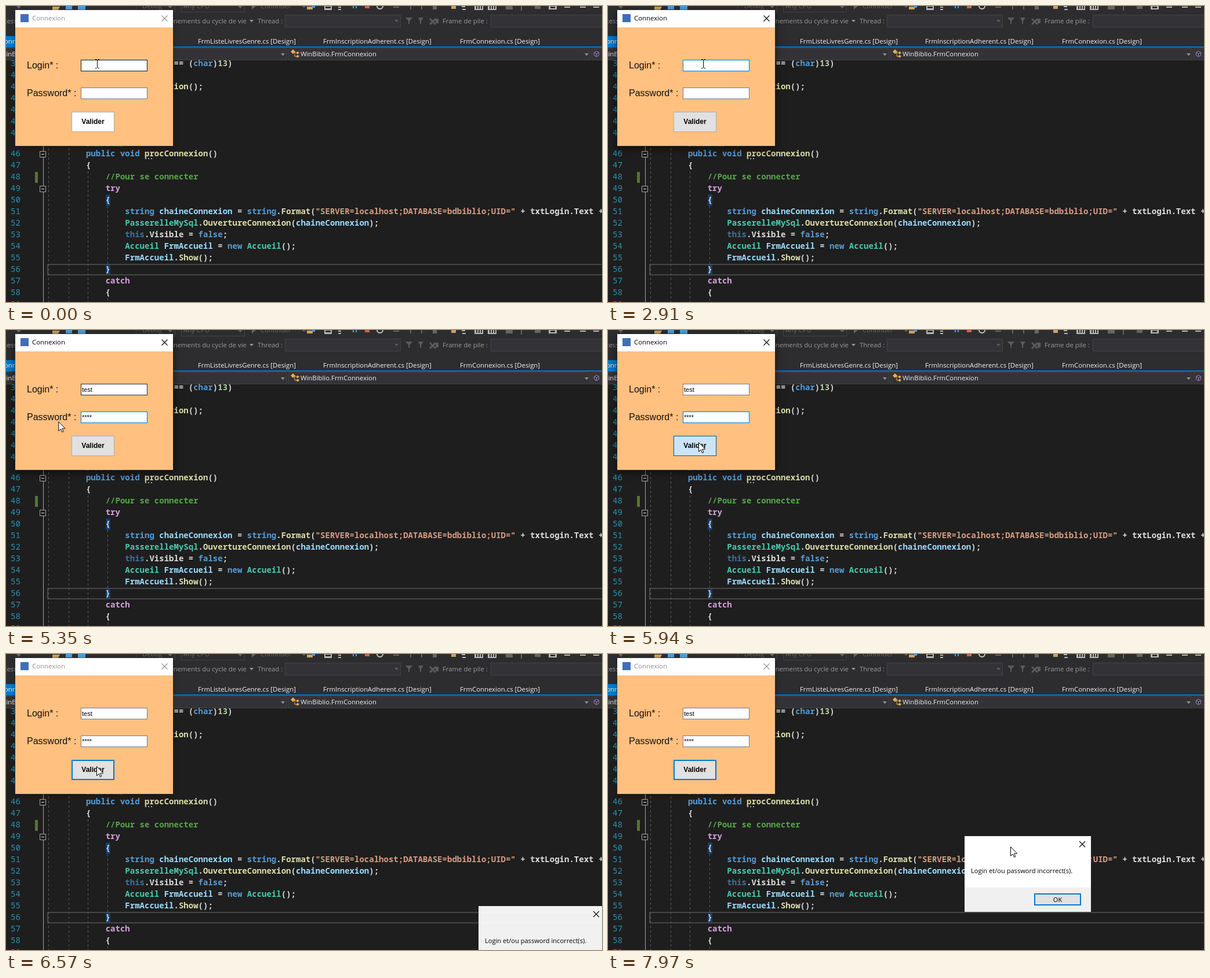
Recreate the animation shown at these times as an HTML page. Size 1028 px wide and 512 px high, loop 7.99 s.

```html
<!DOCTYPE html>
<html lang="fr">
<head>
<meta charset="utf-8">
<title>Connexion</title>
<style>
html, body { margin: 0; width: 100%; height: 100%; overflow: hidden; background: #1e1e1e; }
* { box-sizing: border-box; animation-duration: 7.99s; animation-iteration-count: infinite; animation-timing-function: linear; }
#stage { position: absolute; inset: 0; width: 1028px; height: 512px; overflow: hidden; }
#stage > *, #form > *, #dialog > *, #pointer > * { position: absolute; }
svg { left: 0; top: 0; overflow: visible; }
.ui, #dialog, #title { font-family: "Open Sans", "Noto Sans", sans-serif; }
.ui { font-size: 11.35px; }

/* editor */
pre { margin: 0; font: 600 14.04px/20.08px "Noto Sans Mono", "DejaVu Sans Mono", monospace; color: #dcdcdc; white-space: pre; }
.nums { left: 8px; color: #2b91af; font-weight: 500; }
.code { left: 70.6px; }
.high { top: 88.5px; }
.low { top: 244.5px; }
.k { color: #569cd6; } .d { color: #3f719b; } .c { color: #d8a0df; } .t { color: #4ec9b0; }
.v { color: #9cdcfe; } .m { color: #dcdcaa; } .s { color: #d69d85; } .n { color: #b5cea8; } .r { color: #57a64a; }

/* login form */
#form { left: 16px; top: 7px; width: 272px; height: 235px; background: linear-gradient(#fff 30px, #ffc080 30px); animation-name: shade; }
#icon { left: 9px; top: 7px; width: 14px; height: 14px; background: #3f6fb8; }
#title { left: 29px; top: 5px; font-size: 11.4px; line-height: 18px; animation-name: title; }
#x { left: 252px; top: 9px; animation-name: title; }
.label { left: 20px; font: 16px/20px "Liberation Sans", Arial, sans-serif; color: #111; }
.field { left: 113px; width: 115px; height: 20px; border: 1px solid #7a7a7a; background: #fff; padding-left: 1px; font: 11px/18px "Liberation Sans", Arial, sans-serif; color: #000; }
.field span { display: block; height: 18px; overflow: hidden; white-space: nowrap; animation-timing-function: step-end; }
#login { top: 86px; animation-name: login; }
#login span { animation-name: typeLogin; }
#pass { top: 134px; animation-name: pass; }
#pass span { animation-name: typePass; }
#caret { left: 116px; top: 89px; width: 1px; height: 13px; background: #000; animation-name: caret; animation-timing-function: step-end; }
#ok { left: 97px; top: 176px; width: 74px; height: 35px; text-align: center; font: bold 12px/35px "Liberation Sans", Arial, sans-serif; color: #000; animation-name: button; animation-timing-function: step-end; }

/* message box */
#dialog { left: 0; top: 0; width: 218px; height: 131px; background: linear-gradient(#fff 89px, #f0f0f0 89px); color: #000; font-size: 11.1px; animation-name: dialog; }
#msg { left: 11px; top: 52px; line-height: 16px; white-space: nowrap; }
#dialog .btn { left: 120px; top: 99px; width: 81px; height: 21px; border: 2px solid #0078d7; background: #e1e1e1; text-align: center; line-height: 17px; }

#pointer { left: 0; top: 0; width: 0; height: 0; animation-name: move; }
#beam { animation-name: beam; animation-timing-function: step-end; }
#arrow { animation-name: arrow; animation-timing-function: step-end; }

@keyframes shade {
  0%, 14.393%, 79.599%, 100% { box-shadow: 0 0 0 1px #3a3a3a66, 0 2px 8px rgba(0,0,0,.35); }
  16.646%, 79.5% { box-shadow: 0 0 0 1px #3a3a3a66, 0 4px 14px rgba(0,0,0,.6); }
}
@keyframes title {
  0%, 14.393%, 79.599%, 100% { color: #8f8f8f; }
  15.2%, 79.5% { color: #000; }
}
@keyframes login {
  0%, 14.393% { border-color: #171717; background: #fdfdfd; }
  16.646%, 48.685% { border-color: #0078d7; background: #fff; }
  48.686%, 66.96% { border-color: #2a2a2a; }
  69%, 100% { border-color: #7a7a7a; background: #fff; }
}
@keyframes pass {
  0%, 14.393% { border-color: #7a7a7a; background: #fdfdfd; }
  16.646%, 48.685% { border-color: #7a7a7a; background: #fff; }
  48.686%, 74.342% { border-color: #0078d7; }
  76.5%, 100% { border-color: #7a7a7a; background: #fff; }
}
@keyframes typeLogin {
  0% { width: 0; } 42.303% { width: 3px; } 43.054% { width: 9px; }
  45.307% { width: 14.7px; } 46.433%, 100% { width: 30px; }
}
@keyframes typePass {
  0% { width: 0; } 51.314% { width: 4.3px; } 53.317% { width: 8.6px; }
  56.32% { width: 12.9px; } 57.447%, 100% { width: 30px; }
}
@keyframes caret {
  0%, 23.154%, 36.421%, 63.8%, 74.343%, 100% { opacity: 0; transform: none; }
  16.646%, 29.787% { opacity: 1; transform: none; }
  42.303% { opacity: 1; transform: translate(3px, 0); }
  43.054% { opacity: 1; transform: translate(8px, 0); }
  45.307% { opacity: 1; transform: translate(14px, 0); }
  46.433% { opacity: 1; transform: translate(17px, 0); }
  48.686% { opacity: 1; transform: translate(0, 48px); }
  51.314% { opacity: 1; transform: translate(4px, 48px); }
  53.317% { opacity: 1; transform: translate(8px, 48px); }
  56.32% { opacity: 1; transform: translate(12px, 48px); }
  57.447%, 70.463% { opacity: 1; transform: translate(16px, 48px); }
}
@keyframes button {
  0% { background: #fdfdfd; box-shadow: inset 0 0 0 1px #adadad; }
  15.2% { background: #e1e1e1; box-shadow: inset 0 0 0 1px #adadad; }
  69.2% { background: #e5f1fb; box-shadow: inset 0 0 0 1px #0078d7; }
  74.343% { background: #cce4f7; box-shadow: inset 0 0 0 1px #005499; }
  76.2% { background: #e5f1fb; box-shadow: inset 0 0 0 2px #0078d7; }
  77.347%, 100% { background: #e1e1e1; box-shadow: inset 0 0 0 2px #0078d7; }
}
@keyframes dialog {
  0%, 79.598% { opacity: 0; transform: translate(815px, 436px) scale(.95); }
  79.599% { opacity: .02; transform: translate(815px, 436px) scale(.95); }
  79.975% { opacity: .06; transform: translate(815px, 436px) scale(.963); }
  82.228% { opacity: .94; transform: translate(815px, 436px); }
  82.603% { opacity: 1; transform: translate(815px, 436px); animation-timing-function: step-end; }
  95.62% { opacity: 1; transform: translate(810px, 433px); animation-timing-function: step-end; }
  95.995% { opacity: 1; transform: translate(786px, 417px); animation-timing-function: step-end; }
  96.371% { opacity: 1; transform: translate(690px, 350px); animation-timing-function: step-end; }
  96.746% { opacity: 1; transform: translate(599px, 317px); animation-timing-function: step-end; }
  97.372%, 100% { opacity: 1; transform: translate(615px, 315px); }
}
@keyframes move {
  0%, 20.15% { transform: translate(157px, 100px); }
  21.7%, 63.204% { transform: translate(164px, 100px); }
  63.955% { transform: translate(118px, 83px); }
  64.831% { transform: translate(60px, 88px); }
  65.457% { transform: translate(52px, 110px); }
  66.208% { transform: translate(66px, 140px); }
  66.959% { transform: translate(90px, 158px); }
  68.836% { transform: translate(122px, 180px); }
  72.466% { transform: translate(156px, 194px); }
  83.5% { transform: translate(156px, 194px); animation-timing-function: ease-in-out; }
  89.362%, 89.737% { transform: translate(897px, 410px); }
  92.616% { transform: translate(896px, 454px); animation-timing-function: step-end; }
  95.62% { transform: translate(880px, 446px); animation-timing-function: step-end; }
  95.995% { transform: translate(837px, 417px); animation-timing-function: step-end; }
  96.371% { transform: translate(720px, 352px); animation-timing-function: step-end; }
  96.746% { transform: translate(679px, 335px); animation-timing-function: step-end; }
  97.372% { transform: translate(696px, 333px); animation-timing-function: step-end; }
  99.75%, 100% { transform: translate(694px, 333px); }
}
@keyframes beam { 0%, 63.204% { opacity: 1; } 42.303%, 63.8%, 100% { opacity: 0; } }
@keyframes arrow { 0% { opacity: 0; } 63.8%, 100% { opacity: 1; } }
</style>
</head>
<body>
<div id="stage">
  <svg class="ui" width="1028" height="512">
    <rect width="1028" height="94" fill="#2d2d30"/>
    <!-- toolbar, cut off by the top edge -->
    <g fill="none" stroke="#434346">
      <path d="M224.5 0V10.5H291.5V0M302.5 0V10.5H411.5V0"/>
      <path d="M481.5 15.5H680.5V36.5H481.5ZM1030 15.5H836.5V36.5H1030" fill="#333337"/>
    </g>
    <g fill="#656565">
      <text x="235" y="4">Debug</text><text x="306" y="4">Any CPU</text><text x="439" y="4">Continuer</text>
      <path d="M279 0h8l-4 4zM400 0h8l-4 4zM424 0h7l-7 6zM511 0h6l-3 3zM18 0h8l-4 5z"/>
      <path d="M668 1h10v2h-10zM697 0h2v6h-2zM716 0h2v6h-2zM736 0h7v6h-7zM862 0h12v6h-12zM888 0h2v8h-2zM912 0h10v5h-10z"/>
    </g>
    <path d="M80 1h13l-3 6H80zM519 1h10v5h-10zM768 0h8v5h-8z" fill="#c9a262"/>
    <path d="M103 0h11v6h-11zM124 0h13v7h-13zM528 0h5v3h-5zM598 0h2v4h-2zM603 0h2v4h-2z" fill="#4f9fd8"/>
    <path d="M619 0h8v4h-8z" fill="#d9604a"/>
    <path d="M640 0a5 5 0 0 0 10 0" fill="none" stroke="#c8c8c8" stroke-width="2"/>
    <path d="M549 0h13v7h-13zM573 1h5v2h-5zM573 5h5v2h-5zM786 0h6v2h-6zM787 5h6v2h-6zM808 0h15v7h-15zM831 0h15v7h-15zM936 0h14v6h-14zM963 1h10v2h-10zM990 1h10v2h-10zM1013 1h10v2h-10z" fill="#b5b5b5"/>
    <path d="M551 1h9v3h-9zM811 0h2v5h-2zM815 0h2v5h-2zM819 0h2v5h-2zM834 0h2v5h-2zM838 0h2v5h-2zM842 0h2v5h-2zM939 1h8v3h-8z" fill="#2d2d30"/>

    <g fill="#999">
      <text x="-4" y="30">cess</text>
      <text x="415" y="30" text-anchor="end">Événements du cycle de vie</text>
      <text x="434" y="30">Thread :</text><text x="753" y="30">Frame de pile :</text>
      <path d="M420 24h7l-3.500 4z"/>
    </g>
    <g fill="#5b5b5e">
      <path d="M670 24h7l-3.500 4zM689 20h12l-5 6v6l-2-2v-4zM711 20h9l-4 6v6l-2-2v-4zM732 21l4 4 4-4 2 2-4 4 4 4-2 2-4-4-4 4-2-2 4-4-4-4zM741 22h5v8h-5z"/>
    </g>

    <!-- document tabs and navigation bar -->
    <path d="M0 52H200V72H0ZM0 70H1028V72H0Z" fill="#007acc"/>
    <g fill="#f1f1f1">
      <text x="-3" y="65">onn</text>
      <text x="331" y="65">FrmListeLivresGenre.cs [Design]</text>
      <text x="547" y="65">FrmInscriptionAdherent.cs [Design]</text>
      <text x="783" y="65">FrmConnexion.cs [Design]</text>
    </g>
    <path d="M-2 73.500H484.500V93.500H-2ZM487.500 73.500H1007.500V93.500H487.500ZM1010.500 73.500H1030V93.500H1010.500Z" fill="#333337" stroke="#434346"/>
    <g fill="#f1f1f1"><text x="-10" y="87">WinBiblio</text><text x="508" y="87">WinBiblio.FrmConnexion</text></g>
    <path d="M474 82h7l-3.500 4zM998 82h7l-3.500 4z" fill="#999"/>
    <path d="M491 79l4-4 4 4-4 4zM500 81l3-2.500 3 2.500-3 2.500zM500 87l3-2.500 3 2.500-3 2.500z" fill="#e8ab53"/>
    <path d="M496 80h4M498 80v7h3" fill="none" stroke="#e8ab53"/>
    <path d="M1018.500 78l4 2.300v5l-4 2.300-4-2.300v-5zM1014.500 80.300l4 2.400 4-2.400M1018.500 82.700v5" fill="none" stroke="#a77fc9"/>

    <!-- editor furniture -->
    <text x="138" y="243" fill="#8a8a8a" font-size="11">2 références</text>
    <path d="M50 287h5v19h-5z" fill="#577430"/>
    <path d="M172 326h8v20h-8zM172 446h8v20h-8z" fill="#113d6f"/>
    <path d="M1030 447H72V465H1030" fill="none" stroke="#464646" stroke-width="2"/>
    <g fill="none" stroke="#5a5a5a" stroke-dasharray="4 4">
      <path d="M73.500 246V512M108.500 246V512M141.500 286V512M175.500 346V446M175.500 506V512"/>
    </g>
    <path d="M64.500 242V512" stroke="#a5a5a5"/>
    <path d="M58.500 251.500h10v10h-10zM58.500 311.500h10v10h-10z" fill="#1e1e1e" stroke="#a5a5a5"/>
    <path d="M61 256.500h5M61 316.500h5" stroke="#dcdcdc"/>
    <path d="M240 263h2v2h-2zM245 263h2v2h-2zM250 263h2v2h-2z" fill="#aaa"/>
  </svg>

<pre class="nums high">39
40
41
42
43
44
45</pre>
<pre class="nums low">46
47
48
49
50
51
52
53
54
55
56
57
58
59</pre>
<pre class="code high">            <span class="c">if</span> (e.KeyChar == (<span class="k">char</span>)<span class="n">13</span>)

                <span class="m">procConnexion</span>();</pre>
<pre class="code low">        <span class="k">public void</span> <span class="m">procConnexion</span>()
        {
            <span class="r">//Pour se connecter</span>
            <span class="c">try</span>
            {
                <span class="k">string</span> <span class="v">chaineConnexion</span> = <span class="k">string</span>.<span class="m">Format</span>(<span class="s">"SERVER=localhost;DATABASE=bdbiblio;UID="</span> + txtLogin.Text +
                <span class="t">PasserelleMySql</span>.<span class="m">OuvertureConnexion</span>(<span class="v">chaineConnexion</span>);
                <span class="d">this</span>.Visible = <span class="k">false</span>;
                <span class="t">Accueil</span> <span class="v">FrmAccueil</span> = <span class="k">new</span> <span class="t">Accueil</span>();
                <span class="v">FrmAccueil</span>.<span class="m">Show</span>();
            }
            <span class="c">catch</span>
            {</pre>

  <div id="form">
    <div id="icon"></div>
    <div id="title">Connexion</div>
    <svg id="x" width="11" height="11"><path d="M.5 .5l10 10M10.500 .5l-10 10" stroke="currentColor" stroke-width="1.100"/></svg>
    <div class="label" style="top:86px">Login* :</div>
    <div class="label" style="top:134px">Password* :</div>
    <div class="field" id="login"><span>test</span></div>
    <div class="field" id="pass"><span>****</span></div>
    <div id="caret"></div>
    <div id="ok">Valider</div>
  </div>

  <div id="dialog">
    <svg style="left:198px;top:9px" width="10" height="10"><path d="M0 0l10 10M10 0L0 10" stroke="#000" stroke-width="1.100"/></svg>
    <div id="msg">Login et/ou password incorrect(s).</div>
    <div class="btn">OK</div>
  </div>

  <div id="pointer">
    <svg width="1" height="1">
      <path id="beam" d="M-3 -7.500H-.5M1.500 -7.500H4M.5 -7V7M-3 7.500H-.5M1.500 7.500H4" fill="none" stroke="#000"/>
      <path id="arrow" d="M.5 .5V16.500L4.200 13 6.600 18.500 8.900 17.500 6.500 12.200H11.700Z" fill="#fff" stroke="#000"/>
    </svg>
  </div>
</div>
</body>
</html>
```
